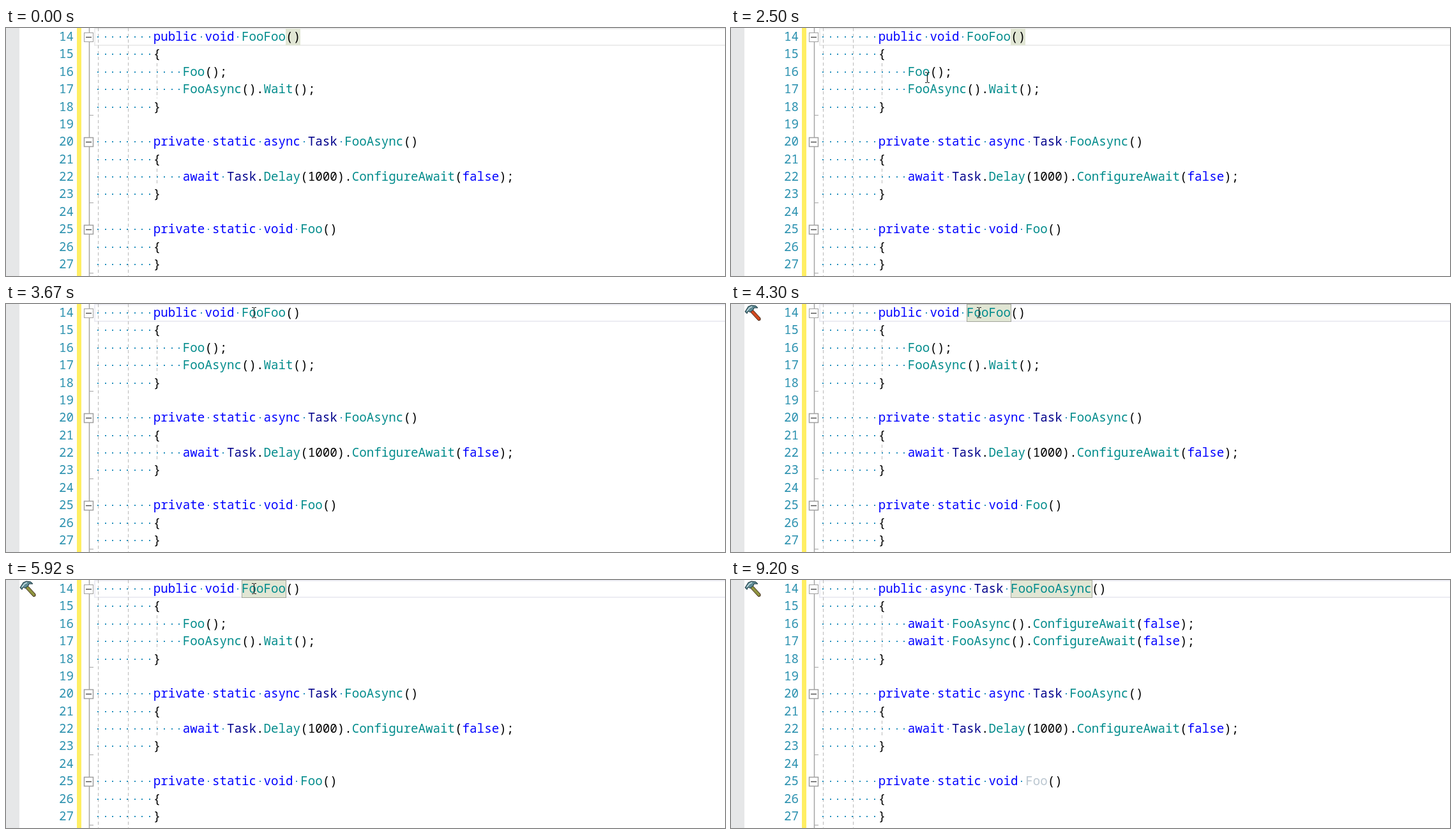
Write an HTML page with a canvas that moves like this. It is 1126 by 388 pixels and loops after 9380 ms.

```html
<!DOCTYPE html>
<html lang="en">
<head>
<meta charset="utf-8">
<title>Convert to async</title>
<style>
  html, body { margin: 0; height: 100%; overflow: hidden; background: #fff; }
  canvas { display: block; }
</style>
</head>
<body>
<canvas id="stage" width="1126" height="388"></canvas>
<script>
const ctx = document.getElementById('stage').getContext('2d');
const LOOP = 9380, LEFT = 138.6, CHAR = 11.52, ROW = 27.38, FIRST = 14;

const before = [
  '        public void FooFoo()',
  '        {',
  '            Foo();',
  '            FooAsync().Wait();',
  '        }',
  '',
  '        private static async Task FooAsync()',
  '        {',
  '            await Task.Delay(1000).ConfigureAwait(false);',
  '        }',
  '',
  '        private static void Foo()',
  '        {',
  '        }'
];
const after = before.slice();
after[0] = '        public async Task FooFooAsync()';
after[2] = after[3] = '            await FooAsync().ConfigureAwait(false);';

const keywords = /^(public|private|static|void|async|await|false)$/;
const colX = col => LEFT + col * CHAR;
const rowY = line => (line - FIRST) * ROW;

function rect(x, y, w, h, color) {
  ctx.fillStyle = color;
  ctx.fillRect(x, y, w, h);
}

function stroke(points, color, width = 1, dash = []) {
  ctx.strokeStyle = color;
  ctx.lineWidth = width;
  ctx.setLineDash(dash);
  ctx.beginPath();
  points.forEach(([x, y]) => ctx.lineTo(x, y));
  ctx.stroke();
  ctx.setLineDash([]);
}

function polygon(points, fill, edge) {
  ctx.beginPath();
  points.forEach(([x, y]) => ctx.lineTo(x, y));
  ctx.closePath();
  ctx.fillStyle = fill;
  ctx.fill();
  ctx.strokeStyle = edge;
  ctx.lineWidth = 1;
  ctx.stroke();
}

function tokenColor(token) {
  if (keywords.test(token)) return '#0000ff';
  if (token === 'Task') return '#00008b';
  return /^[A-Z]/.test(token) ? '#008b8b' : '#000';
}

function drawCode(lines, unusedFoo) {
  lines.forEach((text, i) => {
    const base = Math.round(20 + i * ROW);
    ctx.fillStyle = '#2b91af';
    ctx.fillText(FIRST + i, 83, base);
    for (const { 0: token, index } of text.matchAll(/\w+|\W/g)) {
      const x = colX(index);
      if (token === ' ') {
        rect(Math.round(x + CHAR / 2 - 1), base - 7, 2, 2, '#2490bd');
        continue;
      }
      ctx.fillStyle = unusedFoo && i === 11 && token === 'Foo' ? '#bac6d0' : tokenColor(token);
      ctx.fillText(token, x, base);
    }
  });
}

function drawGuides() {
  const guide = (x, top, bottom) => stroke([[x, top], [x, bottom]], '#b9b9b9', 1, [5, 4]);
  guide(144.5, 0, 388);
  guide(191.5, 0, 388);
  guide(236.5, 55, 110);
  guide(236.5, 220, 247);

  stroke([[130.5, 0], [130.5, 388]], '#a5a5a5', 1.5);
  for (const y of [136.5, 273.5, 383.5]) stroke([[130, y], [137, y]], '#a5a5a5');
  for (const line of [14, 20, 25]) {
    const y = Math.round(rowY(line)) + 14.5;
    rect(122, y - 7.5, 15, 15, '#fff');
    ctx.strokeStyle = '#a0a0a0';
    ctx.strokeRect(122.5, y - 7, 14, 14);
    stroke([[125, y], [134, y]], '#555', 1.5);
  }
}

function drawCurrentLine(line, color) {
  const y = Math.round(rowY(line));
  rect(138, y, 988, 2, color);
  rect(138, y + 26, 988, 2, color);
  rect(138, y, 2, 28, color);
}

function highlight(line, col, length, border) {
  const x = Math.round(colX(col)), y = Math.round(rowY(line)), w = Math.round(length * CHAR);
  rect(x, y + 1, w, 26, '#e1e6d4');
  if (!border) return;
  ctx.strokeStyle = '#a3a69c';
  ctx.lineWidth = 1;
  ctx.strokeRect(x + .5, y + .5, w, 27);
}

function drawHammer(handle) {
  polygon([[30, 12], [34, 9], [46, 22], [46, 25], [43, 26]], handle, '#3a2414');
  polygon([[22, 12], [27, 4], [32, 2], [39, 3], [42, 6], [36, 6], [35, 9], [30, 13], [27, 11], [25, 15]],
    '#5f8a94', '#17333c');
  stroke([[25, 11], [29, 6], [33, 4]], '#c9e0e4', 1.5);
}

// Pointer path as [time, x, y]
const path = [
  [700, 959, 326], [760, 938, 306], [1000, 938, 306], [1090, 941, 302], [1500, 941, 302],
  [1860, 668, 185], [2400, 307, 77], [3000, 307, 77], [3210, 339, 33], [3520, 388, 13],
  [7900, 388, 13], [8660, 1056, 402]
];

function drawPointer(t) {
  const i = path.findIndex(p => p[0] > t);
  if (i < 1) return;
  const [t0, x0, y0] = path[i - 1], [t1, x1, y1] = path[i];
  const k = (t - t0) / (t1 - t0);
  const x = Math.round(x0 + (x1 - x0) * k) + .5, y = Math.round(y0 + (y1 - y0) * k);
  stroke([[x, y - 7], [x, y + 8]], '#222', 1.3);
  for (const end of [y - 7.5, y + 8.5]) {
    stroke([[x - 3.5, end], [x - .5, end]], '#222');
    stroke([[x + .5, end], [x + 3.5, end]], '#222');
  }
}

function draw(t) {
  const during = (from, to) => t >= from && t < to;
  const caret = (line, col) => rect(Math.round(colX(col)), Math.round(rowY(line)) + 1, 2, 26, '#000');
  const converted = t >= 6020;

  rect(0, 0, 1126, 388, '#fff');
  rect(0, 0, 21, 388, '#e6e7e8');
  rect(111, 0, 7, 388, '#ffee62');

  if (during(2650, 3670)) drawCurrentLine(16, '#e2e2f0');
  else drawCurrentLine(14, t < 2650 ? '#ececec' : '#ececf3');
  drawGuides();

  if (t < 2650) highlight(14, 26, 2);
  if (during(2980, 3670)) {
    highlight(16, 12, 3);
    highlight(25, 28, 3, true);
  }
  if (during(3970, 6020)) highlight(14, 20, 6, true);
  if (t >= 9110) highlight(14, 26, 11, true);

  ctx.font = '19.2px "Noto Sans Mono", "DejaVu Sans Mono", monospace';
  drawCode(converted ? after : before, t >= 6090);

  if (t >= 3970) drawHammer(during(3970, 4760) ? '#d2481f' : '#8f9440');
  if (during(2650, 3190)) caret(16, 15);
  if (during(3760, 4300)) caret(14, 21);
  if (during(6020, 6470) || during(7010, 7560) || during(8100, 8640)) caret(14, 27);
  drawPointer(t);
}

const start = performance.now();
function tick() {
  draw((performance.now() - start) % LOOP);
  requestAnimationFrame(tick);
}
tick();
</script>
</body>
</html>
```
